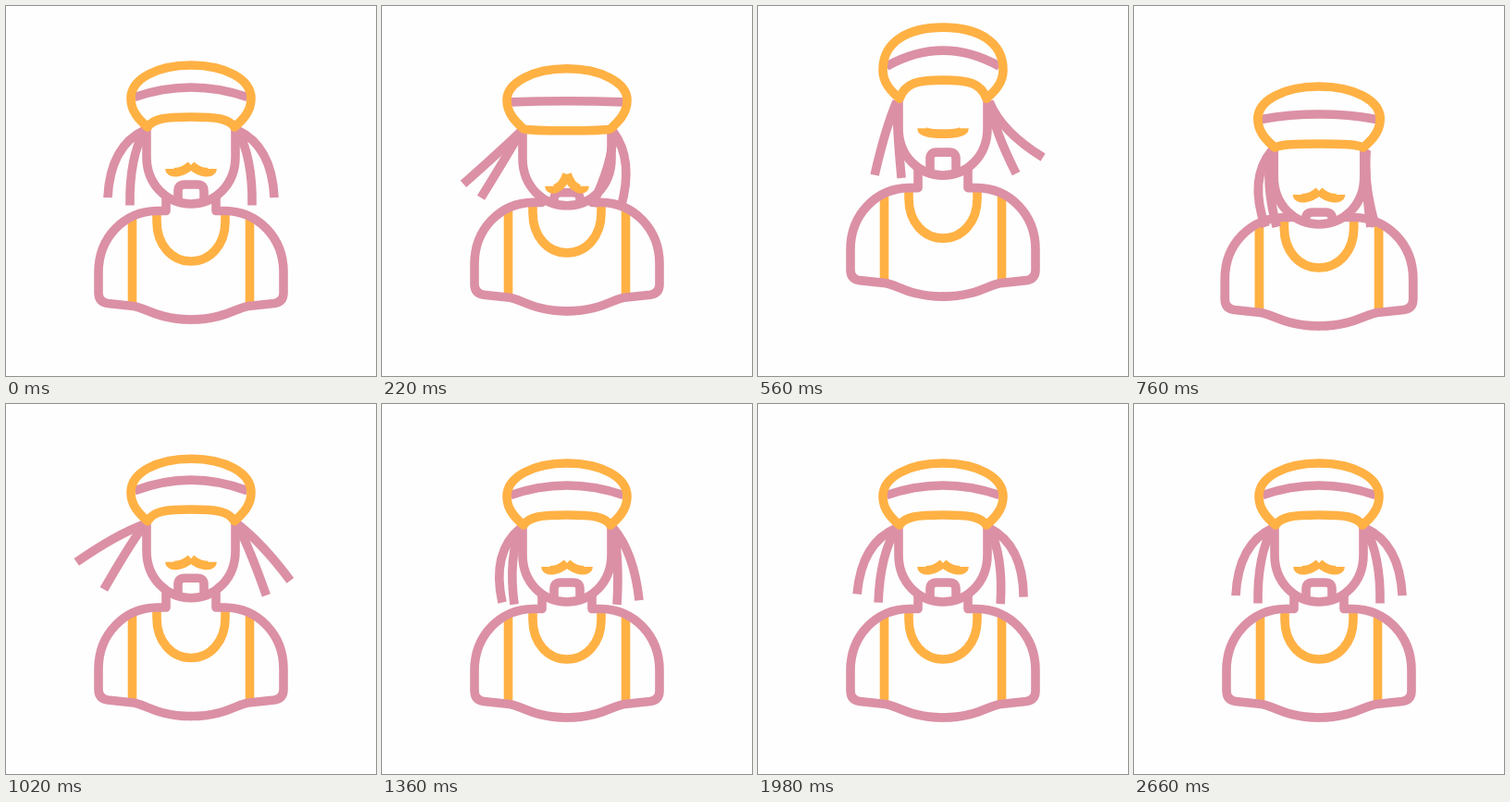
These frames come from a looping animation (400 px wide and 400 px high, 2680 ms). An HTML page with a canvas:

```html
<!DOCTYPE html>
<html lang="en">
<head>
<meta charset="utf-8">
<title>Bouncing man with dreadlocks</title>
<style>
  html, body { margin: 0; width: 100%; height: 100%; overflow: hidden; background: #fefefe; }
  canvas { display: block; width: 100vmin; height: 100vmin; }
</style>
</head>
<body>
<canvas id="stage" width="400" height="400"></canvas>
<script>
const ctx = document.getElementById('stage').getContext('2d');
const LOOP = 2680;
const PINK = '#db90a5';
const ORANGE = '#ffb144';
const BRIM_Y = 131;
const LOCK_LENGTH = 86;

// time, body, head, hat top, rim arch, moustache tip, moustache middle, beard top
const POSES = [
  [0, 0, 0, -67, -11, -38, -42, -21],
  [110, 8, 20, -66, -3, -31, -35, -13],
  [220, -9, 2, -65, 2, -21, -34, -14],
  [340, -26, -27, -71, -9, -35, -39, -20],
  [460, -36, -42, -77, -20, -48, -44, -25],
  [560, -25, -31, -77, -20, -51, -45, -25],
  [720, 8, 18, -66, -6, -37, -38, -15],
  [760, 7, 22, -66, -4, -32, -36, -13],
  [940, -4, -6, -68, -13, -40, -43, -22],
  [1100, 1, -2, -67, -12, -38, -42, -21],
  [1250, 0, 0, -67, -11, -38, -42, -21],
  [LOOP, 0, 0, -67, -11, -38, -42, -21]
];

// time, then outer reach, inner reach and bend for the left and right locks
const HAIR = [
  [0, 40, 16, 1, 40, 16, 1],
  [110, 48, 28, .5, 26, 0, 1],
  [220, 62, 43, 0, 8, -23, .8],
  [380, 48, 20, 0, 30, 5, .1],
  [560, 24, -5, .15, 58, 29, -.5],
  [600, 20, -8, .3, 60, 31, -.5],
  [760, 7, -5, .9, 10, 5, -.3],
  [1000, 75, 45, .2, 55, 30, .2],
  [1090, 62, 36, .6, 62, 34, .4],
  [1360, 20, 7, 1, 28, 4, .5],
  [1660, 38, 14, 1, 46, 20, 1],
  [1950, 43, 20, 1, 37, 12, 1],
  [2300, 39, 15, 1, 41, 17, 1],
  [LOOP, 40, 16, 1, 40, 16, 1]
];

// Monotone slope: flat at turning points, smooth while passing through
function slope(keys, i, column) {
  if (i === 0 || i === keys.length - 1) return 0;
  const rate = j => (keys[j + 1][column] - keys[j][column]) / (keys[j + 1][0] - keys[j][0]);
  const before = rate(i - 1), after = rate(i);
  return before * after <= 0 ? 0 : 2 * before * after / (before + after);
}

function sample(keys, time) {
  let i = 0;
  while (i < keys.length - 2 && keys[i + 1][0] <= time) i++;
  const from = keys[i], to = keys[i + 1];
  const span = to[0] - from[0];
  const u = (time - from[0]) / span;
  const ease = u * u * (3 - 2 * u);
  return from.slice(1).map((value, k) => {
    const c = k + 1;
    return value + (to[c] - value) * ease
      + span * u * (1 - u) * ((1 - u) * slope(keys, i, c) - u * slope(keys, i + 1, c));
  });
}

function stroke(color, path) {
  ctx.strokeStyle = color;
  ctx.stroke(new Path2D(path));
}

// Strokes a path given for the right half on both sides of the centre line
function mirror(color, path) {
  for (const side of [1, -1]) {
    ctx.save();
    ctx.scale(side, 1);
    stroke(color, path);
    ctx.restore();
  }
}

function shifted(y, draw) {
  ctx.save();
  ctx.translate(0, y);
  draw();
  ctx.restore();
}

function drawBody(neckTop) {
  ctx.lineCap = 'butt';
  mirror(ORANGE, 'M63.5 230V322');
  mirror(ORANGE, 'M37 225V233C37 258 21 276 0 276');
  ctx.lineCap = 'round';
  mirror(PINK, `M27 ${neckTop}V221.5H37C72 222 100 250 100 288V310Q100 320 90 321.5L62 324.5C50 326 35 339 0 339`);
}

function drawLock(side, reach, bend) {
  const drop = Math.sqrt(LOCK_LENGTH ** 2 - reach ** 2);
  const controlX = 50 + reach * .38 + bend * drop / LOCK_LENGTH;
  const controlY = 3 + drop * .38 - bend * reach / LOCK_LENGTH;
  ctx.save();
  ctx.scale(side, 1);
  stroke(PINK, `M50 3Q${controlX} ${controlY} ${50 + reach} ${drop}`);
  ctx.restore();
}

function drawHair([leftOuter, leftInner, leftBend, rightOuter, rightInner, rightBend]) {
  drawLock(-1, leftOuter, leftBend * 25);
  drawLock(-1, leftInner, leftBend * 11);
  drawLock(1, rightOuter, rightBend * 25);
  drawLock(1, rightInner, rightBend * 11);
}

function drawFace(tip, middle, beard) {
  mirror(PINK, 'M48 2V32C48 62 26 83 0 83');
  const tipX = 23 - .45 * Math.max(0, tip - middle - 4);
  shifted(83, () => {
    mirror(PINK, `M14 -3V${beard + 7}Q14 ${beard} 7 ${beard}H0`);
    mirror(ORANGE, `M${tipX} ${tip}C${tipX} ${tip + 5} ${tipX - 12} ${tip + 6} 0 ${middle}`);
  });
}

function drawHat(top, arch) {
  const bandEnd = -29.5 + arch * .27;
  const bandControl = 2 * (arch - 32) - bandEnd;
  stroke(PINK, `M-61 ${bandEnd}Q0 ${bandControl} 61 ${bandEnd}`);
  mirror(ORANGE, `M0 ${top}C37 ${top} 65 ${top + 15} 65 -31C65 -17 56 -8 47 0C41 ${arch * .85} 28 ${arch} 0 ${arch}`);
}

function render(time) {
  const [body, head, top, arch, tip, middle, beard] = sample(POSES, time);
  ctx.setTransform(1, 0, 0, 1, 0, 0);
  ctx.fillStyle = '#fefefe';
  ctx.fillRect(0, 0, 400, 400);
  ctx.translate(200, 0);
  ctx.scale(1 + .0025 * Math.max(0, body), 1);
  ctx.lineWidth = 9.6;
  ctx.lineJoin = 'round';
  shifted(body, () => drawBody(206 + head - body));
  shifted(BRIM_Y + head, () => {
    drawHair(sample(HAIR, time));
    drawFace(tip, middle, beard);
    drawHat(top, arch);
  });
}

function tick() {
  render(performance.now() % LOOP);
  requestAnimationFrame(tick);
}
tick();
</script>
</body>
</html>
```
